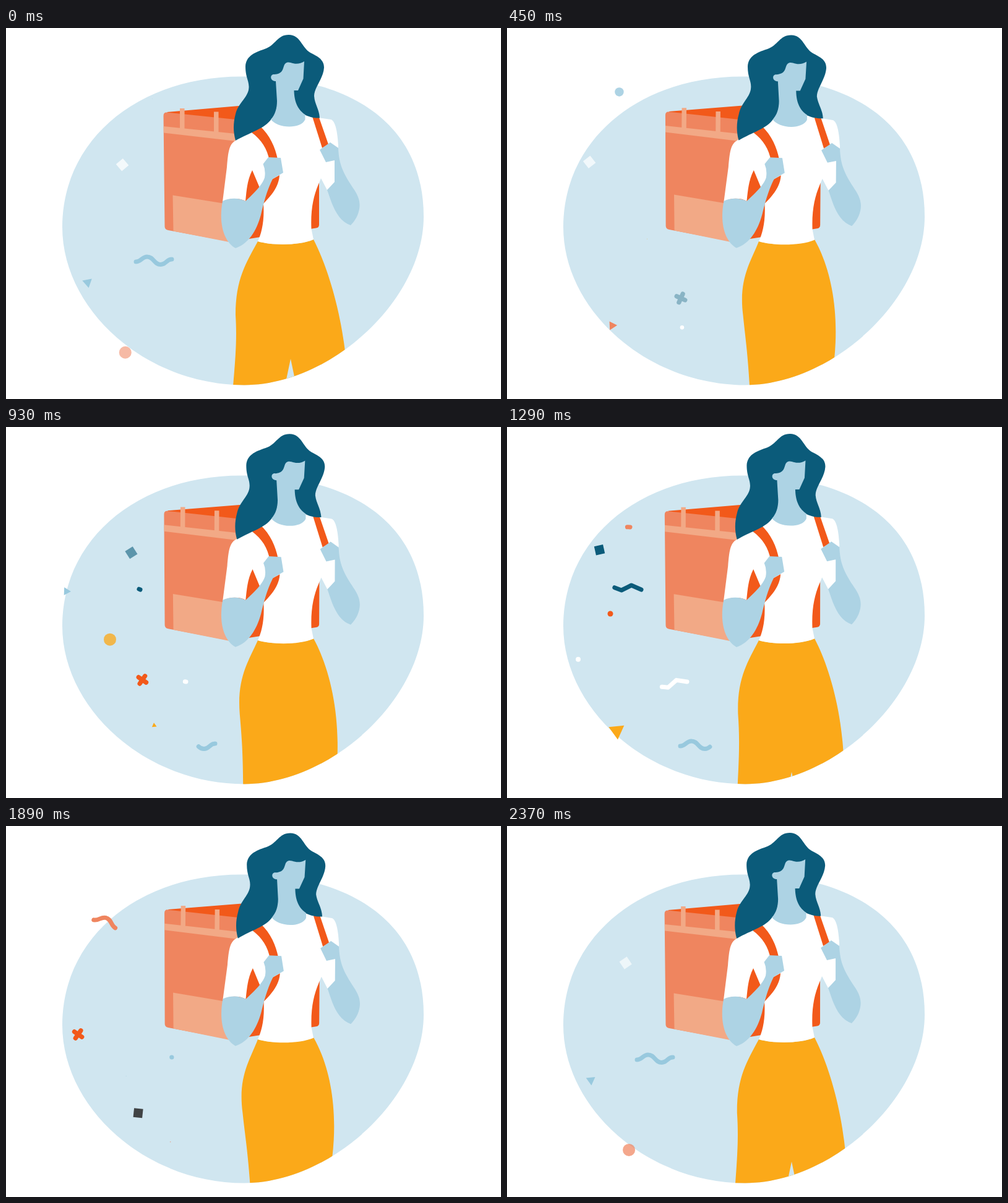
Write an HTML page that moves like this. It is 800 px wide and 600 px high and loops after 2.4 s.

```html
<!DOCTYPE html>
<html lang="en">
<head>
<meta charset="utf-8">
<title>Walk</title>
<style>
html, body { margin: 0; width: 100%; height: 100%; overflow: hidden; background: #fff; }
svg { display: block; width: 100vw; height: 100vh; }
</style>
</head>
<body>
<svg viewBox="0 0 800 600">
  <defs>
    <path id="blob" d="M380 78.5C545 76 675 148 675 305C675 440 525 577.5 385 577.5C225 577.5 91 455 91 322C91 180 214 78.5 380 78.5Z"/>
    <clipPath id="inBlob"><use href="#blob"/></clipPath>
  </defs>
  <use href="#blob" fill="#d0e6f0"/>
  <g id="confetti"></g>

  <g class="sway">
    <path fill="#f2591a" d="M260 136L376 126L420 122L506 240V318Q506 323 501 323.500L362 346L340 200Z"/>
    <path fill="#ef855f" d="M260 136.500L376 148.500V348L262 327Q256.500 326 256.500 321L254.500 142Q254.500 136 260 136.500Z"/>
    <path fill="#f2a986" d="M254.700 159L376 171.500V183.500L254.800 169.500ZM281 130H288.500V165H281ZM336 135.500H343.500V172H336ZM269.500 270.500L360 285V346L270.500 328.500Z"/>
  </g>

  <g clip-path="url(#inBlob)">
    <path id="skirt" fill="#fba919"/>
    <path id="slit" fill="#d0e6f0"/>
  </g>

  <g class="sway">
    <path fill="#fff" d="M371 182C360 188 359 202 357 225L350 281C362 274 378 275 387 280C389 260 390 246 398 230L409 256Q415 270 416 284C418 312 413 332 407 345C430 352 474 352 497 342L493.500 325C492 290 498 268 507 248L509 243L519 262L533 250L537 190C536 172 533 150 525 148L505 145L480 135H430Z"/>
    <path fill="#f2591a" d="M397 169L410 158C427 174 435 193 439 212L426 215C422 195 413 181 397 169ZM494 140L505 142L521 188L511 194ZM442 238C441 256 430 270 415 285L424 248Z"/>
    <path fill="#add3e4" d="M507 197L524 185L537 194C538 222 546 236 561 259C573 276 574 288 568 303Q564 312 557 319Q546 315 539 306C528 292 524 275 519 262L531 249V214L517 217Z"/>
    <path fill="#add3e4" d="M350 280C362 274 378 275 387 280C402 266 414 254 418 242Q420 230 415.500 220L424 209L444 210L448 234L431 244C421 264 416 285 412 302C405 328 392 349 371 356C353 346 343 318 350 280Z"/>
    <path id="hair" fill="#0b5b7a"/>
    <path fill="#add3e4" d="M482 54L480.500 82L472 101H465.500C466 122 473 133 483.500 140V148C480 156 469 159.500 458 159.500C445 159.500 434 155 428 148C435 140 438 130 438 118L436 86C426 86 426 74 434 75C446 74 447 68 449 62C451 55 456 55 460 56C468 59 476 58 482 54Z"/>
  </g>
</svg>
<script>
const NS = 'http://www.w3.org/2000/svg', LOOP = 2400, HALF_STEP = 600;
const NAVY = '#0b5b7a', RED = '#f2591a', SALMON = '#ef855f', GOLD = '#fba919';
const BLUE = '#98c9de', PALE = '#add3e4', WHITE = '#fff', COAL = '#404345';
const $ = id => document.getElementById(id);
const clamp = v => Math.max(0, Math.min(1, v));
const swaying = document.querySelectorAll('.sway');

// p: 0 with the legs apart, 1 with the legs together
function drawBody(t) {
  const p = 1 - Math.pow(Math.abs(t % (2 * HALF_STEP) - HALF_STEP) / HALF_STEP, 1.3);
  swaying.forEach(g => g.setAttribute('transform', `rotate(${.5 * p} 400 340)`));
  $('skirt').setAttribute('d',
    `M407 345C${388 + 6 * p} 380 ${371 + 4 * p} 406 ${371 + 12.5 * p} 464` +
    `C${373 + 14 * p} 497 ${372 + 20 * p} 522 ${367 + 30 * p} 579` +
    `V600H560L${554 - 36 * p} 590L${548 - 23 * p} ${523 + 17 * p}` +
    `C${540 - 3 * p} 455 ${520 + 3 * p} 387 497 342C474 352 430 352 407 345Z`);
  const top = Math.min(590, 535 + 120 * p), half = (590 - top) * .21;
  $('slit').setAttribute('d', `M460 ${top}L${460 + half} 590H${460 - half}Z`);
  const s = 2.8 * p;
  $('hair').setAttribute('d',
    `M457 11C476 11 478 32 492 40C506 47 514 52 514 64C513 82 ${498 + s / 2} 96 ${498 + s / 2} 110` +
    `C${499 + s} 124 ${506 + s} 130 ${507 + s} 145.5C498 146 490 144 480 139L440 110` +
    `C438 130 437 139 429 147C418 163 396 168 ${371 + s} 182` +
    `C${367 + s} 168 ${367 + s} 154 ${371 + s} 139C${376 + s / 2} 120 392 112 392.5 96` +
    'C393 85 387 80 387 62C388 46 400 40 418 34C436 28 438 11 457 11Z');
}

// flying pieces grow, drift left away from mid height, spin and fade;
// ribbons stay put, draw on from their right end and wipe off the same way
const kinds = {
  dot: { d: 'M-1 0A1 1 0 1 1 1 0A1 1 0 1 1 -1 0Z', life: 650, size: 10, grow: .7 },
  tri: { d: 'M.577 0L-.289 .5V-.5Z', life: 650, size: 20, grow: .7, turn: 50, spin: -165 },
  box: { d: 'M-.5 -.5H.5V.5H-.5Z', life: 800, size: 14.6, turn: -5, spin: -195 },
  cross: { d: 'M-5 -5L5 5M5 -5L-5 5', life: 460, size: 1.05, grow: .35, spin: -50, stroke: true },
  wave: { d: 'M0 0C-9 0 -9 8.5 -18 8.5C-29 8.5 -29 -4 -40 -4C-48 -4 -50 4 -58 4', life: 885, ribbon: true, stroke: true },
  zig: { d: 'M0 0L-16 -7L-32 1L-45 -4', life: 885, ribbon: true, stroke: true }
};
const base = { turn: 0, spin: 0, size: 1, speed: 122 };
const pieces = [];

function add(kind, color, born, x, y, extra) {
  const p = { ...base, ...kinds[kind], ...extra, born, x, y };
  const el = p.el = document.createElementNS(NS, 'path');
  const attrs = p.stroke
    ? { fill: 'none', stroke: color, 'stroke-width': 7, 'stroke-linecap': 'round', 'stroke-linejoin': 'round' }
    : { fill: color };
  if (p.ribbon) attrs.pathLength = 1;
  for (const name in attrs) el.setAttribute(name, attrs[name]);
  el.setAttribute('d', p.d);
  $('confetti').appendChild(el);
  pieces.push(p);
}

add('dot', PALE, 2370, 240, 115, { life: 950 });
add('dot', WHITE, 220, 311, 479, { size: 6.5 });
add('dot', GOLD, 430, 229, 341);
add('dot', RED, 1085, 192, 302);
add('dot', WHITE, 1110, 137, 374);
add('dot', SALMON, 1860, 270, 510, { speed: 143 });
add('tri', SALMON, 130, 209, 474);
add('tri', GOLD, 770, 267, 479, { life: 800, size: 27, speed: 172 });
add('tri', BLUE, 1850, 199, 404, { life: 850, size: 17 });
add('tri', BLUE, 640, 133, 267);
add('box', WHITE, 2220, 210, 223);
add('box', NAVY, 790, 223, 205, { speed: 147 });
add('box', COAL, 1485, 263, 456);
add('cross', NAVY, 40, 331, 430);
add('cross', RED, 720, 246, 406);
add('cross', RED, 1690, 141, 336);
add('wave', BLUE, 1870, 268, 374);
add('wave', BLUE, 640, 338, 512);
add('wave', SALMON, 1190, 199, 162, { turn: 14 });
add('zig', NAVY, 850, 217, 263);
add('zig', WHITE, 860, 291, 412, { turn: -15 });

function drawPiece(p, t) {
  const { el, life } = p, age = (t - p.born + LOOP) % LOOP, sec = age / 1000;
  el.style.display = age < life ? '' : 'none';
  if (age >= life) return;
  if (p.ribbon) {
    const on = Math.pow(clamp(age / 450), 1.8), off = clamp((age - 600) / (life - 600));
    el.setAttribute('stroke-dasharray', `${Math.max(.001, on - off)} 9`);
    el.setAttribute('stroke-dashoffset', -off);
    el.setAttribute('transform', `translate(${p.x} ${p.y}) rotate(${p.turn})`);
    return;
  }
  const x = p.x - p.speed * sec, y = p.y + .13 * (p.y - 300) * sec;
  const fadeIn = p.grow ? 1 : clamp(age / 240);
  const scale = p.size * (p.grow ? clamp(age / (life * p.grow)) : 1);
  el.setAttribute('opacity', Math.min(fadeIn, clamp((life - age) / (life * .3))));
  el.setAttribute('transform', `translate(${x} ${y}) rotate(${p.turn + p.spin * sec}) scale(${scale})`);
}

function draw(ms) {
  const t = ms % LOOP;
  drawBody(t);
  pieces.forEach(p => drawPiece(p, t));
}

let start;
function tick(now) {
  start ??= now;
  draw(now - start);
  requestAnimationFrame(tick);
}
draw(0);
requestAnimationFrame(tick);
</script>
</body>
</html>
```
